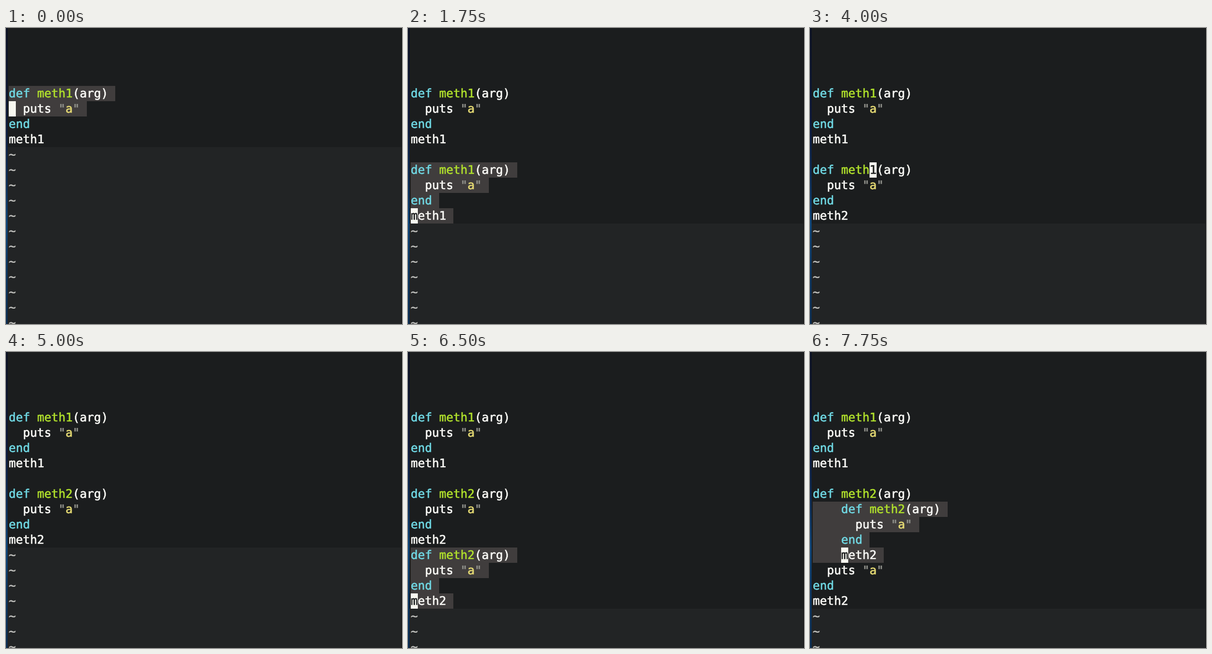
Animation of 725 by 542 pixels, one loop 8000 ms. Source, as an HTML page:

```html
<!DOCTYPE html>
<html lang="en">
<head>
<meta charset="utf-8">
<title>Editor</title>
<style>
  html, body { margin: 0; width: 100%; height: 100%; overflow: hidden; background: #1b1d1e; }
  #stage { position: relative; width: 725px; height: 542px; overflow: hidden; }
  #edge, #rim, #filler, .row, .sel, .cur, .txt { position: absolute; }
  #edge {
    left: 0; top: 0; width: 3px; height: 542px;
    background: linear-gradient(#0a1022, #0b1638 30%, #0c2c55 52%, #0d4478 66%, #0b3560 80%, #0b2c50);
  }
  #rim { right: 0; top: 0; width: 1px; height: 542px; background: #101112; }
  #filler { left: 3px; right: 1px; bottom: 0; background: #222425; }
  .row {
    left: 5px; height: 28px; white-space: pre; color: #fcfcf8;
    font: 21.6px/30px "DejaVu Sans Mono", monospace;
    text-rendering: geometricPrecision;
    -webkit-text-stroke: 0.6px currentColor;
  }
  .txt { left: 0; top: 0; }
  .sel { left: 0; top: 0; height: 28px; background: #403d3d; }
  .cur { top: 0; width: 13px; height: 28px; background: #f8f8f0; color: #1b1d1e; }
  .kw { color: #70d9e4; }
  .fn { color: #b0e02c; }
  .q { color: #8f908a; }
  .str { color: #e6db74; }
  .nt { color: #c4c4c0; }
</style>
</head>
<body>
<div id="stage">
  <div id="filler"></div>
  <div id="text"></div>
  <div id="edge"></div>
  <div id="rim"></div>
</div>
<script>
const CELL = 13, ROW = 28, TOP = 106, ROWS = 16, LOOP = 8000;

const block = (def, call = def, indent = 0) =>
  [`def meth${def}(arg)`, '  puts "a"', 'end', `meth${call}`].map(s => ' '.repeat(indent) + s);

const one = block(1);
const copied = [...one, ...block(1)];
const pair = (def, call) => [...one, '', ...block(def, call)];
const done = pair(2, 2);

// Nested copy inserted at the given line
const nested = (at, indent) =>
  [...done.slice(0, at), ...block(2, 2, indent), ...done.slice(at)];

// [start ms, lines, selected rows or null, cursor row and column or null]
const steps = [
  [0, one, [0, 1], [1, 0]],
  [250, one, [0, 2], [2, 0]],
  [500, one, [0, 3], [3, 0]],
  [1000, copied, [4, 7], [7, 0]],
  [1500, pair(1, 1), [5, 8], [8, 0]],
  [2250, pair(1, 1), null, [8, 0]],
  [2750, pair(1, 1), null, null],
  [3250, pair(1, 1), null, [8, 4]],
  [3500, pair(1, 2), null, [8, 4]],
  [4000, pair(1, 2), null, [5, 8]],
  [4250, done, null, [5, 8]],
  [4750, done, null, null],
  [5250, done, null, [5, 0]],
  [5500, done, [5, 6], [6, 0]],
  [5750, done, [5, 8], [8, 0]],
  [6000, done, [5, 8], [8, 5]],
  [6500, nested(9, 0), [9, 12], [12, 0]],
  [7000, nested(9, 2), [9, 12], [12, 2]],
  [7250, nested(9, 4), [9, 12], [12, 4]],
  [7500, nested(8, 4), [8, 11], [11, 4]],
  [7750, nested(6, 4), [6, 9], [9, 4]]
];

const span = (cls, s, style = '') => `<span class="${cls}" style="${style}">${s}</span>`;

const paint = line => line
  .replace(/^( *)(def )(\w+)/, (_, pad, kw, name) => pad + span('kw', kw) + span('fn', name))
  .replace(/^( *)end$/, (_, pad) => pad + span('kw', 'end'))
  .replace(/"a"$/, span('q', '&quot;') + span('str', 'a') + span('q', '&quot;'));

function rowHtml(i, lines, sel, cur) {
  const line = lines[i];
  let html = '';
  if (line === undefined) {
    html = span('txt nt', '~');
  } else {
    if (sel && i >= sel[0] && i <= sel[1])
      html += span('sel', '', `width:${(line.length + 1) * CELL}px`);
    html += span('txt', paint(line));
    if (cur && cur[0] === i)
      html += span('cur', line[cur[1]] || ' ', `left:${cur[1] * CELL}px`);
  }
  return `<div class="row" style="top:${TOP + i * ROW}px">${html}</div>`;
}

const text = document.getElementById('text');
const filler = document.getElementById('filler');
const start = performance.now();
let shown = null;

function draw(now) {
  const t = Math.max(0, now - start) % LOOP;
  const step = steps.findLast(s => s[0] <= t);
  if (step !== shown) {
    shown = step;
    const [, lines, sel, cur] = step;
    filler.style.top = TOP + lines.length * ROW + 'px';
    text.innerHTML = Array.from({ length: ROWS }, (_, i) => rowHtml(i, lines, sel, cur)).join('');
  }
  requestAnimationFrame(draw);
}
draw(start);
</script>
</body>
</html>
```
